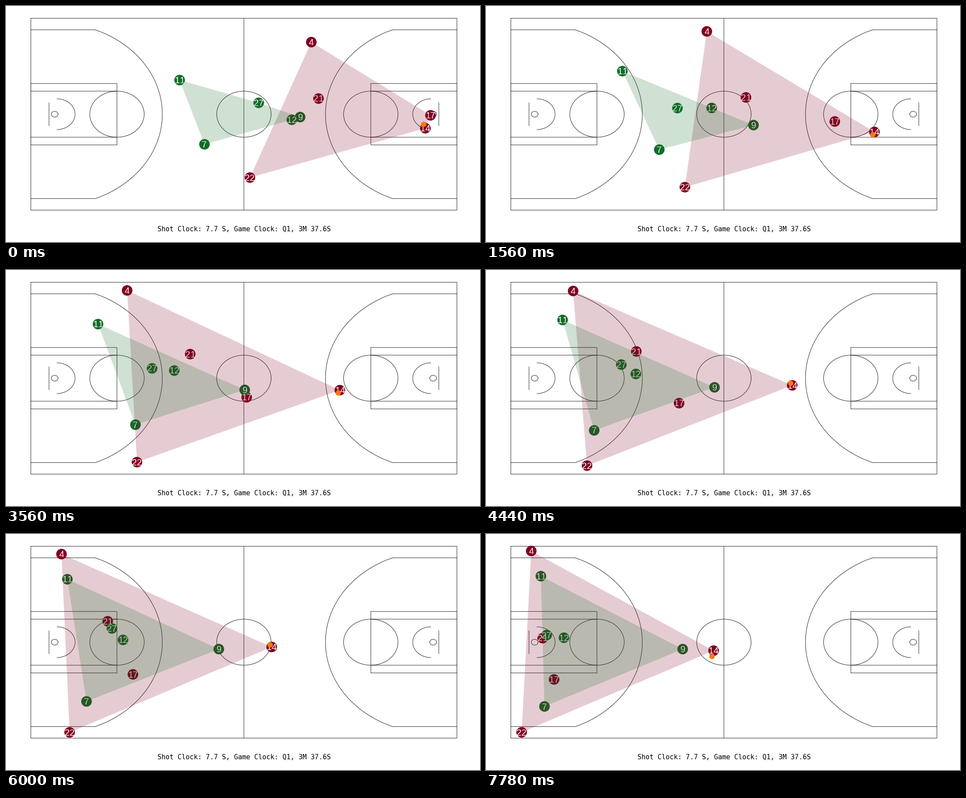
Animation of 1058x529 px, one loop 8000 ms. Source, as a matplotlib script:

```python
import numpy as np
import matplotlib.pyplot as plt
from matplotlib.animation import FuncAnimation
from matplotlib.patches import Circle, Polygon

W, H, DPI = 1058, 529, 100
PX = 72 / DPI  # one pixel in points
LOOP_MS, TICK_MS = 8000, 40
STEPS = 36  # poses per loop, each held until the next

RED, GREEN, ORANGE = "#800020", "#106d26", "#ff7800"

# Each run is a smooth curve through four points, reached at these steps.
KEYS = np.array([0, 12, 20, 35])
AWAY = {
    "4": [(681.5, 81), (364.5, 47), (194.5, 47), (101, 38)],
    "14": [(936, 274), (805.5, 279.5), (683.5, 258.5), (508, 261.5)],
    "17": [(947.5, 245), (648.5, 272), (431, 298.5), (152, 326)],
    "21": [(697.5, 207.5), (489.5, 198), (335.5, 182.5), (126.5, 233.5)],
    "22": [(544.5, 384.5), (363.5, 420.5), (225.5, 438.5), (79.5, 444.5)],
}
HOME = {
    "7": [(443, 310), (337, 334), (241.5, 359.5), (130.5, 386.5)],
    "9": [(656.5, 249), (559, 272), (510, 263), (439, 258)],
    "11": [(387.5, 166), (247.5, 132), (171, 112), (122.5, 94.5)],
    "12": [(638, 255), (424, 221), (334.5, 233), (174, 232.5)],
    "27": [(564, 217), (357, 228.5), (302, 212), (135.5, 226.5)],
}
DRIBBLER = "14"


def run(points):
    """Natural cubic spline through the points, sampled at every step."""
    v = np.array(points, float)
    n = len(v)
    h = np.diff(KEYS).astype(float)
    slope = np.diff(v, axis=0) / h[:, None]
    a, b = np.eye(n), np.zeros_like(v)
    for i in range(1, n - 1):
        a[i, i - 1:i + 2] = h[i - 1], 2 * (h[i - 1] + h[i]), h[i]
        b[i] = 6 * (slope[i] - slope[i - 1])
    m = np.linalg.solve(a, b)

    t = np.arange(STEPS)
    i = np.clip(np.searchsorted(KEYS, t, side="right") - 1, 0, n - 2)
    p, q, d = (s[:, None] for s in (KEYS[i + 1] - t, t - KEYS[i], h[i]))
    return ((m[i] * p**3 + m[i + 1] * q**3) / (6 * d)
            + (v[i] / d - m[i] * d / 6) * p
            + (v[i + 1] / d - m[i + 1] * d / 6) * q)


def dribble(step):
    """Offset of the ball from the player who dribbles it."""
    return -3.5, 2 + 11 * np.cos(2 * np.pi * (step - 11.5) / 24)


def hull(points):
    """Convex hull by the monotone chain method."""
    pts = sorted(map(tuple, points))

    def chain(seq):
        out = []
        for x, y in seq:
            while len(out) > 1:
                (ax, ay), (bx, by) = out[-2:]
                if (bx - ax) * (y - ay) - (by - ay) * (x - ax) > 0:
                    break
                out.pop()
            out.append((x, y))
        return out[:-1]

    return chain(pts) + chain(pts[::-1])


fig = plt.figure(figsize=(W / DPI, H / DPI), dpi=DPI, facecolor="white")
ax = fig.add_axes([0, 0, 1, 1])
ax.set_xlim(0, W)
ax.set_ylim(H, 0)
ax.axis("off")

# Court, measured in feet
LEFT, TOP, RIGHT, BOTTOM = 55.5, 27.5, 1006.5, 457.5
LENGTH, WIDTH = 94, 50
MID = WIDTH / 2


def draw(x, y, flip=False, **style):
    x, y = np.asarray(x, float), np.asarray(y, float)
    if flip:
        x = LENGTH - x
    ax.plot(LEFT + x * (RIGHT - LEFT) / LENGTH,
            TOP + y * (BOTTOM - TOP) / WIDTH,
            lw=0.85 * PX, color="black", snap=False, zorder=1, **style)


def box(x0, y0, x1, y1, flip=False):
    draw([x0, x1, x1, x0, x0], [y0, y0, y1, y1, y0], flip,
         solid_joinstyle="miter")


def arc(x, r, start=0, end=360, flip=False, **style):
    """Arc round (x, MID); angle 0 points to mid court."""
    a = np.radians(np.linspace(start, end, 121))
    draw(x + r * np.cos(a), MID + r * np.sin(a), flip, **style)


def half_court(flip):
    # Key and free throw circle
    box(0, 17, 19, 33, flip)
    for y in (19, 31):
        draw([0, 19], [y, y], flip)
    arc(19, 6, -107, 107, flip)
    arc(19, 6, 107, 253, flip)
    # Basket
    arc(5.25, 0.75, flip=flip)
    draw([4, 4], [22, 28], flip)
    arc(5.75, 4, -90, 90, flip)
    # Three point line
    r, side = 23.75, 22
    bend = np.degrees(np.arcsin(side / r))
    arc(5.25, r, -bend, bend, flip)
    for y in (MID - side, MID + side):
        draw([0, 5.25 + np.sqrt(r**2 - side**2)], [y, y], flip)


box(0, 0, LENGTH, WIDTH)
draw([LENGTH / 2] * 2, [0, WIDTH])
arc(LENGTH / 2, 6)
half_court(False)
half_court(True)

ax.text(531, 505.3, "Shot Clock: 7.7 S, Game Clock: Q1, 3M 37.6S",
        family="DejaVu Sans Mono", size=15 * PX, color="black",
        ha="center", va="baseline")


def disc(r, color, zorder):
    return ax.add_patch(Circle((0, 0), r, fc=color, lw=0, zorder=zorder))


class Player:
    DIGIT = 11.1  # digits are set one by one, without kerning

    def __init__(self, number, points, color, rank):
        self.path = run(points)
        self.dot = disc(11.8, color, 2 + rank)
        self.digits = [ax.text(0, 0, d, family="Liberation Sans",
                               size=20 * PX, color="white", ha="center",
                               va="baseline", zorder=4) for d in number]

    def move(self, step):
        x, y = self.path[step]
        self.dot.center = x, y
        first = x - self.DIGIT * (len(self.digits) - 1) / 2
        for i, digit in enumerate(self.digits):
            digit.set_position((first + i * self.DIGIT, y + 7))


class Team:
    def __init__(self, runs, color, rank):
        self.players = {number: Player(number, points, color, rank)
                        for number, points in runs.items()}
        self.area = ax.add_patch(Polygon([(0, 0)] * 3, fc=color, alpha=0.2,
                                         lw=0, zorder=5 + rank))

    def move(self, step):
        for player in self.players.values():
            player.move(step)
        self.area.set_xy(hull(p.path[step] for p in self.players.values()))


away, home = Team(AWAY, RED, 0), Team(HOME, GREEN, 1)
ball = disc(6, ORANGE, 8)


def update(tick):
    # A pose starts with the tick in which it falls due.
    step = (tick * TICK_MS + TICK_MS - 5) * STEPS // LOOP_MS
    away.move(step)
    home.move(step)
    ball.center = tuple(away.players[DRIBBLER].path[step] + dribble(step))
    return []


anim = FuncAnimation(fig, update, frames=LOOP_MS // TICK_MS, interval=TICK_MS,
                     init_func=lambda: update(0), repeat=True, repeat_delay=0,
                     blit=False)
plt.show()
```
